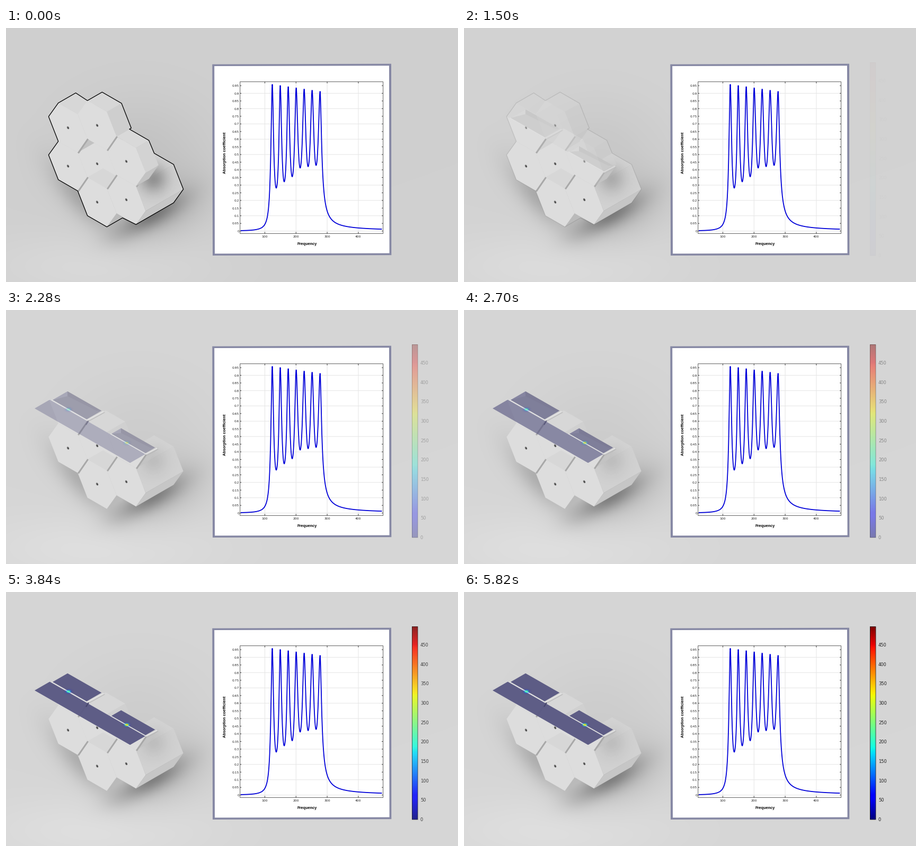
A matplotlib script that plays this animation: 853x480 px, repeating every 5880 ms.

```python
import numpy as np
import matplotlib.pyplot as plt
from matplotlib.animation import FuncAnimation
from matplotlib.patches import Ellipse, Polygon

W, H, DPI = 853, 480, 64
FRAMES, STEP = 98, 60
PT = 72 / DPI

fig = plt.figure(figsize=(W / DPI, H / DPI), dpi=DPI)
ax = fig.add_axes([0, 0, 1, 1])
ax.axis("off")
jet = plt.get_cmap("jet")


def gray(v):
    return (v / 255,) * 3


def poly(pts, color, z):
    return ax.add_patch(Polygon(pts, fc=color, ec="none", lw=0, zorder=z))


def line(pts, color, px, z):
    xs, ys = np.transpose(pts)
    return ax.plot(xs, ys, color=color, lw=px * PT, zorder=z, snap=False,
                   solid_capstyle="butt")[0]


def box_line(x0, y0, x1, y1, color, px, z):
    return line([(x0, y0), (x1, y0), (x1, y1), (x0, y1), (x0, y0)], color, px, z)


def text(x, y, s, px, **kw):
    return ax.text(x, y, s, fontsize=px * PT, zorder=20, **kw)


def image(data, x0, y0, x1, y1, z):
    return ax.imshow(data, extent=(x0, x1, y1, y0), aspect="auto",
                     interpolation="nearest", zorder=z)


def ramp(t, start, end):
    return float(np.clip((t - start) / (end - start), 0, 1))


# ---- backdrop with soft floor shadows
gx, gy = np.meshgrid(np.arange(W) + 0.5, np.arange(H) + 0.5)


def blob(cx, cy, sx, sy, turn=0):
    a = np.radians(turn)
    u = (gx - cx) * np.cos(a) + (gy - cy) * np.sin(a)
    v = (gy - cy) * np.cos(a) - (gx - cx) * np.sin(a)
    return np.exp(-(u / sx) ** 2 / 2 - (v / sy) ** 2 / 2)


def backdrop(base, glow, upper):
    v = base + glow * blob(170, 450, 150, 45)
    v -= 60 * blob(272, 356, 48, 16, -29)
    v -= 26 * blob(295, 340, 60, 38, -25)
    v -= 38 * blob(142, 318, 55, 20, 48)
    v -= upper * blob(250, 245, 95, 80)
    return np.repeat(np.clip(v, 0, 255)[..., None] / 255, 3, axis=2)


image(backdrop(208, 9, 14), 0, 0, W, H, 0)
bg_cut = image(backdrop(214, 9, 9), 0, 0, W, H, 0.1)

# ---- hexagonal prisms on a lattice, extruded along one direction
A, B = np.array([55, -4.5]), np.array([0, 72.5])
BACK = np.array([np.cos(np.pi / 6), -0.5])
ALONG = np.array([np.cos(np.pi / 6), 0.495])
CORNERS = np.array([A + 2 * B, 2 * A + B, A - B]) / 3
CORNERS = np.vstack([CORNERS, -CORNERS])
LOWER = [4, 1, 0, 5]
FRONT = gray(221)


def center(col, row):
    return np.array([117, 188.5]) + col * A + row * B


def prism(col, row, depth, z, shades=(215, 208, 194)):
    front = center(col, row) + CORNERS
    back = front + depth * BACK
    parts = [poly([front[i], back[i], back[i - 1], front[i - 1]], gray(v), z)
             for i, v in zip((1, 2, 3), shades[::-1])] if depth else []
    parts.append(poly(front, FRONT, z))
    return front, back, parts


def hole(col, row, z):
    x, y = center(col, row)
    return [ax.add_patch(Ellipse((x + d, y + d), w, h, angle=-30, fc=gray(v),
                                 ec="none", zorder=z))
            for d, w, h, v in [(0, 4, 5.8, 130), (0.3, 2.2, 4, 70)]]


def seam(front, z):
    """Dark gap along the lower right edge of a cell."""
    return line([front[1] + (1, 0), front[0] + (1, 1)], gray(168), 3, z)


# cells that always stay
prism(1, 1, 40, 1)
f3, _, _ = prism(0, 1, 0, 1.1)
prism(1, 1, 0, 1.1)
f6, b6, _ = prism(1, 2, 34, 1.1, (215, 200, 186))
f7, b7, parts7 = prism(2, 2, 82, 1.2, (211, 209, 198))

# shade that the middle cell throws on the long one
yy, xx = np.mgrid[-1:1:60j, -1:1:60j]
dark = np.zeros((60, 60, 4))
dark[..., 3] = 0.3 * np.exp(-(xx ** 2 + yy ** 2) * 5)
shades = []
for face in parts7[1:3]:
    im = image(dark, 218, 225, 338, 345, 1.3)
    im.set_clip_path(face)
    shades.append(im)

f1, f5 = center(0, 0) + CORNERS, center(2, 1) + CORNERS
poly(f1[LOWER], FRONT, 1.4)
poly([f5[1], f5[1] + 28 * BACK, f5[0] + 28 * BACK, f5[0]], gray(195), 1.4)
poly(f5[LOWER], FRONT, 1.4)
for front in (f1, f3, f5 - A + A, ):
    if front is not f5:
        seam(front, 1.5)
seam(center(1, 1) + CORNERS, 1.5)
for c, r in [(0, 1), (1, 1), (1, 2), (2, 2)]:
    hole(c, r, 1.6)


# ---- what the cut reveals: open boxes and the plane in front of them
def slab(x, y, depth, length):
    p = np.array([x, y])
    return np.array([p, p + depth * BACK, p + depth * BACK + length * ALONG,
                     p + length * ALONG])


SLABS = [slab(54, 186, 33, 208), slab(88, 170, 32.5, 74), slab(199, 234, 21, 74)]
for s in SLABS[1:]:
    a, b, c, d = s
    poly(s, gray(196), 1.7)
    poly([a, b, b + (0, 9)], gray(214), 1.8)
    poly([b, c, c - (9, 0), b + (0, 9)], gray(186), 1.8)
    line([a - (2, 0), d + (1, 1.5), c + (4, 1)], gray(226), 2.2, 1.9)
    line([d + (3, 4), c + (6, 3)], gray(184), 1.2, 1.85)

# ---- caps that dissolve
_, b1, cap1 = prism(0, 0, 38, 3)
f2, b2, cap2 = prism(1, 0, 32, 3.1, (215, 206, 176))
_, b5, cap5 = prism(2, 1, 28, 3.2, (217, 211, 195))
cap = cap1 + cap2 + cap5 + [seam(f1, 3.3), seam(f2, 3.3)]
for c, r in [(0, 0), (1, 0), (2, 1)]:
    cap += hole(c, r, 3.4)

rim = [f1[4], f1[3], b1[3], f2[3], *b2[3:0:-1], *b5[3:1:-1], *b7[3::-1], f7[0],
       b6[0], f6[0], f6[5], f6[4], *f3[[0, 5, 4, 3]], f1[4]]
outline = line(rim, "black", 1.3, 4)

# ---- coloured section planes
planes = [poly(s, (0.35, 0.345, 0.515), 5) for s in SLABS]
planes.append(line([(156, 209), (151, 217)], (0.27, 0.265, 0.42), 2, 5.1))


def hotspot(x, y, peak):
    g = np.exp(-(xx ** 2 + yy ** 2) * 5.5)
    rgba = jet(0.12 + peak * g)
    rgba[..., 3] = np.clip(0.95 * g, 0, 0.85)
    return image(rgba, x - 11, y - 7, x + 11, y + 7, 5.2)


planes += [hotspot(118, 188, 0.36), hotspot(228.5, 251.5, 0.6)]

# ---- chart panel
poly([(389.3, 68.6), (727, 67.6), (727.3, 429.2), (390, 430)], (0.525, 0.535, 0.645), 10)
poly([(393.2, 72), (723, 71.2), (723.6, 425.6), (394, 426.4)], "white", 10.1)

X0, X1, Y0, Y1 = 441.7, 711.6, 101.6, 388.4
INK, GRID = gray(60), gray(229)


def px(freq):
    return 488.5 + (freq - 100) * 0.588


def py(a):
    return 383.7 - a * 289.2


for f in range(100, 401, 100):
    x = px(f)
    line([(x, Y0), (x, Y1)], GRID, 1, 11)
    for y in (Y0, Y1 - 3):
        line([(x, y), (x, y + 3)], INK, 1, 13)
    text(x, 396.3, str(f), 6.1, ha="center", color=gray(30))
for i in range(20):
    y = py(i / 20)
    if i % 2 == 0:
        line([(X0, y), (X1, y)], GRID, 1, 11)
    for x in (X0, X1 - 2.5):
        line([(x, y), (x + 2.5, y)], INK, 1, 13)
    text(440, y + 2.2, f"{i / 20:g}", 6, ha="right", color=gray(30))
box_line(X0, Y0, X1, Y1, gray(95), 1, 12)
label = dict(ha="center", family="Liberation Sans", weight="bold")
text(568.3, 410.4, "Frequency", 7.4, **label)
text(414, 236, "Absorption coefficient", 7.4, va="center", rotation=90, **label)

# resonances: the reciprocal of the curve is smooth between peaks
PEAKS = np.linspace(502.5, 592.7, 7)
TOPS = 1 / np.linspace(0.958, 0.912, 7)
DIPS = 1 / np.array([0.281, 0.322, 0.355, 0.412, 0.421, 0.429])


def absorption(x):
    left = np.maximum(PEAKS[0] - x, 0)
    right = np.maximum(x - PEAKS[-1], 0)
    i = np.clip(np.searchsorted(PEAKS, x) - 1, 0, 5)
    s = np.clip((x - PEAKS[i]) / (PEAKS[1] - PEAKS[0]), 0, 1)
    base = TOPS[i] + (TOPS[i + 1] - TOPS[i]) * s
    mid = (TOPS[i] + TOPS[i + 1]) / 2
    inv = base + (DIPS[i] - mid) * np.sin(np.pi * s) ** 2
    return 1 / (inv + 0.111 * left ** 2 + 0.11 * right ** 2 / (1 + 0.15 * right))


xs = np.linspace(443, 709.5, 2400)
line(np.column_stack([xs, py(absorption(xs))]), (0, 0, 0.85), 1.8, 14)

# ---- colour scale
BAR = (766.5, 65.5, 777, 430)
scale = [image(jet(np.linspace(1, 0, 365))[:, None, :], *BAR, 15),
         box_line(*BAR, gray(30), 0.8, 16)]
for v in range(0, 451, 50):
    scale.append(text(782, 433 - v * 0.7333, str(v), 8.4, color=gray(35)))

ax.set_xlim(0, W)
ax.set_ylim(H, 0)


def fade(artists, alpha):
    for a in artists:
        a.set_alpha(alpha)


def update(i):
    t = i * STEP
    gone = ramp(t, 720, 2040)
    fade([bg_cut], gone)
    fade([outline], 1 - ramp(t, 0, 1680))
    fade(cap, 1 - gone)
    fade(shades, 1 - 0.7 * gone)
    fade(planes, 0.96 * ramp(t, 1740, 3180))
    fade(scale, ramp(t, 1440, 4300))
    return []


anim = FuncAnimation(fig, update, frames=FRAMES, interval=STEP, repeat=True,
                     repeat_delay=0, blit=False)
plt.show()
```
